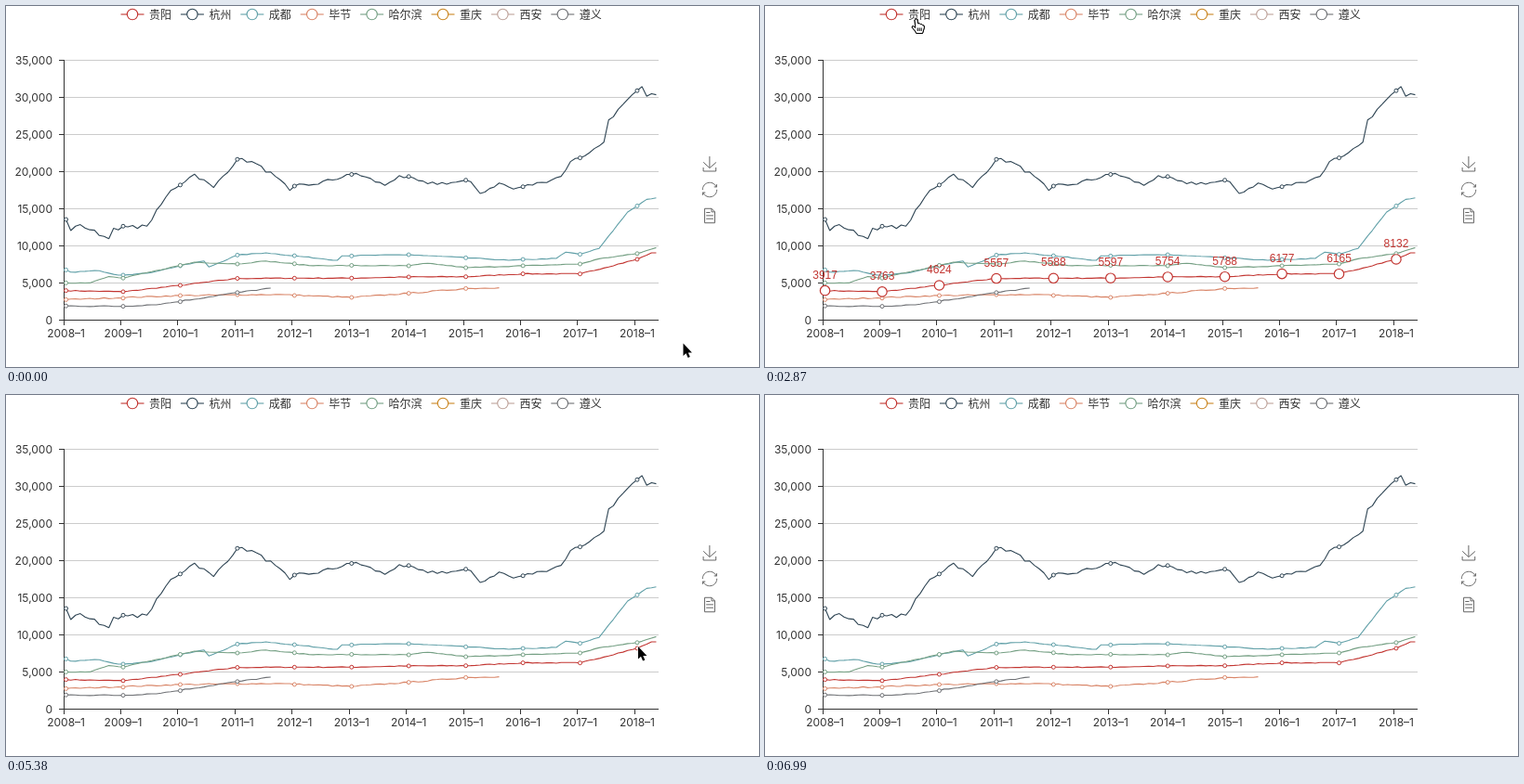
An HTML page with a canvas for the animation above (7350 ms loop, 810 px wide and 389 px high).

```html
<!DOCTYPE html>
<html lang="zh">
<head>
<meta charset="utf-8">
<style>
  html, body { margin: 0; width: 100%; height: 100%; overflow: hidden; background: #fff; }
  canvas { display: block; }
</style>
</head>
<body>
<canvas id="stage" width="810" height="389"></canvas>
<script>
const ctx = document.getElementById('stage').getContext('2d');
const LOOP = 7350, STEPS = 41;
const LEFT = 62, RIGHT = 702, TOP = 58, BASE = 338, BAND = 640 / 125;
const CJK = '"Noto Sans CJK SC", "Noto Sans CJK", sans-serif';
const LATIN = 'Inter, sans-serif';
const LABEL = '"Liberation Sans", Arial, sans-serif';
const RED = '#c23531', INK = '#333';

const januaryPrices = [3917, 3763, 4624, 5557, 5588, 5597, 5754, 5788, 6177, 6165, 8132];

const monthX = month => LEFT + BAND * (month + 0.5);
const priceY = thousands => BASE - thousands * 8;

// Linear interpolation over keys of the form [at, ...values]
function between(keys, at, field = 1) {
  const i = keys.findIndex(key => key[0] >= at);
  if (i <= 0) return keys[0][field];
  const a = keys[i - 1], b = keys[i];
  return a[field] + (b[field] - a[field]) * (at - a[0]) / (b[0] - a[0]);
}

let seed = 7;
const random = () => (seed = seed * 16807 % 2147483647) / 2147483647;

// Monthly prices: straight trends between turning points, with seeded noise
function monthly(keys, noise) {
  const exact = new Set(keys.map(key => key[0]));
  return Array.from({ length: keys.at(-1)[0] + 1 }, (_, month) =>
    between(keys, month) + (exact.has(month) ? 0 : (random() * 2 - 1) * noise));
}

// Turning points as [month, thousands]
const guiyang = [...januaryPrices.map((price, year) => [year * 12, price / 1000]),
  [123, 9], [124, 9]];
const hangzhou = [[0, 13.5], [1, 12], [3, 12.8], [9, 10.9], [10, 12.3], [17, 12.6], [22, 17.4],
  [27, 19.6], [31, 17.8], [36, 21.6], [39, 21.3], [44, 19.3], [47, 17.4], [48, 18], [52, 18.2],
  [61, 19.7], [67, 18.1], [70, 19.4], [76, 18.3], [85, 18.6], [87, 17], [91, 18.4], [94, 17.6],
  [100, 18.5], [104, 19.3], [106, 21.3], [110, 22.5], [113, 23.9], [114, 26.9], [121, 31.4],
  [122, 30.1], [124, 30.3]];
const chengdu = [[0, 6.7], [1, 6.4], [7, 6.6], [11, 6], [17, 6.25], [24, 7.25], [29, 7.9],
  [30, 7.1], [36, 8.7], [42, 9], [57, 8], [58, 8.6], [72, 8.75], [88, 8.2], [93, 8],
  [103, 8.25], [105, 9.1], [108, 8.8], [112, 9.6], [118, 14.5], [122, 16.2], [124, 16.4]];
const bijie = [[0, 2.7], [24, 3.25], [44, 3.4], [60, 3], [72, 3.55], [84, 4.2], [91, 4.3]];
const harbin = [[0, 4.95], [5, 4.95], [9, 5.8], [12, 5.6], [27, 7.75], [36, 7.5], [42, 7.9],
  [51, 7.3], [72, 7.25], [76, 7.6], [84, 7], [108, 7.5], [112, 8.2], [120, 8.9], [124, 9.7]];
const zunyi = [[0, 1.85], [12, 1.8], [20, 2.1], [36, 3.65], [43, 4.25]];

let legendX = 136;
const series = [
  ['贵阳', RED, monthly(guiyang, 0.06)],
  ['杭州', '#2f4554', monthly(hangzhou, 0.25)],
  ['成都', '#61a0a8', monthly(chengdu, 0.05)],
  ['毕节', '#d98669', monthly(bijie, 0.08)],
  ['哈尔滨', '#749f83', monthly(harbin, 0.05)],
  ['重庆', '#ca8622', []],
  ['西安', '#bda29a', []],
  ['遵义', '#6e7074', monthly(zunyi, 0.08)]
].map(([name, color, prices]) => {
  const x = legendX;
  legendX += 40.4 + 12 * name.length;
  return { name, x, color, prices };
});

// Pointer stops as [step, x, y]; it waits below the stage when away
const pointer = [[0, 728.5, 363.5], [1, 750, 379], [3, 760, 410], [4, 662, 352], [8, 385, 113],
  [9, 357, 173], [14, 170, 16], [15, 163, 14], [20, 163, 14], [21, 367.5, 261], [26, 491, 290],
  [29, 690, 247], [30, 680, 271], [31, 680, 274], [35, 680, 274], [38, 709, 375], [39, 712, 410],
  [40, 712, 410]];

function text(str, x, y, font, color = INK, align = 'left') {
  ctx.font = font;
  ctx.fillStyle = color;
  ctx.textAlign = align;
  ctx.fillText(str, x, y);
}

function ring(x, y, r, color, width = 1) {
  ctx.beginPath();
  ctx.arc(x, y, r, 0, Math.PI * 2);
  ctx.fillStyle = '#fff';
  ctx.fill();
  ctx.strokeStyle = color;
  ctx.lineWidth = width;
  ctx.stroke();
}

function polyline(points, color) {
  ctx.beginPath();
  points.forEach(([x, y]) => ctx.lineTo(x, y));
  ctx.strokeStyle = color;
  ctx.lineWidth = 1.1;
  ctx.lineJoin = 'bevel';
  ctx.stroke();
}

function drawAxes() {
  for (let i = 0; i <= 7; i++) {
    const y = priceY(i * 5);
    ctx.fillStyle = '#ccc';
    if (i) ctx.fillRect(LEFT, y, RIGHT - LEFT, 1);
    ctx.fillStyle = INK;
    ctx.fillRect(LEFT - 5, y, 5, 1);
    text((i * 5000).toLocaleString('en-US'), 50, y + 4.5, '12px ' + LATIN, INK, 'right');
  }
  ctx.fillRect(LEFT, TOP, 1, BASE - TOP + 1);
  ctx.fillRect(LEFT, BASE, RIGHT - LEFT, 1);
  for (let year = 0; year <= 10; year++) {
    ctx.fillRect(Math.floor(LEFT + year * 12 * BAND), BASE, 1, 6);
    text(2008 + year + '–1', monthX(year * 12), 356.5, '12px ' + LATIN, INK, 'center');
  }
}

function drawSeries({ name, x, color, prices }) {
  polyline([[x - 12.5, 9], [x + 12.5, 9]], color);
  ring(x, 9, 5.7, color, 1.1);
  text(name, x + 18, 13.5, '12px ' + CJK);
  polyline(prices.map((price, month) => [monthX(month), priceY(price)]), color);
  for (let m = 0; m < prices.length; m += 12) ring(monthX(m), priceY(prices[m]), 2, color);
}

const icons = [
  [170, 29.6, 29, 'M4.7 22.9L29.3 45.5L54.7 23.4M4.6 43.6V58H53.8V43.6M29.2 45.1V0'],
  [198, 30, 30, 'M47 18.9h9.8V8.7M56.3 20.1C52 9 40.5 .6 26.8 2.1C12.6 3.7 1.6 16.2 2.1 30.6' +
    'M13 41.1H3.1v10.2M3.7 39.9c4.2 11.1 15.8 19.5 29.5 18c14.2-1.6 25.2-14.1 24.7-28.5'],
  [226, 31.2, 30, 'M17.5 17.3H33M45.4 29.5h-28M11.5 2v56H51V14.8L38.4 2zM38.4 2.2v12.7H51M45.4 41.7h-28']
].map(([y, cx, cy, d]) => ({ y, cx, cy, path: new Path2D(d) }));

function drawIcon({ y, cx, cy, path }) {
  const scale = 0.276;
  ctx.save();
  ctx.translate(757, y);
  ctx.scale(scale, scale);
  ctx.translate(-cx, -cy);
  ctx.strokeStyle = '#666';
  ctx.lineWidth = 1 / scale;
  ctx.stroke(path);
  ctx.restore();
}

function highlight(price, year) {
  const x = monthX(year * 12), y = priceY(price / 1000);
  ring(x, y, 5.2, RED, 1.2);
  text(price, x, y - 13, '12px ' + LABEL, RED, 'center');
}

function drawTooltip(x) {
  ctx.fillStyle = 'rgba(50,50,50,0.7)';
  ctx.beginPath();
  ctx.roundRect(x, 291, 113, 52, 4);
  ctx.fill();
  text('贵阳', x + 5, 311.5, 'bold 14px ' + CJK, '#fff');
  ctx.fillStyle = RED;
  ctx.beginPath();
  ctx.arc(x + 10, 327, 5, 0, Math.PI * 2);
  ctx.fill();
  text('2018–1: 8,132', x + 20, 332.3, '600 14px ' + LATIN, '#fff');
}

const arrow = new Path2D('M0 0V13.5L3 10.8L5.1 15.6L7.3 14.6L5.3 9.9H9.4Z');
const hand = new Path2D('M-2 1Q-.5-1 1 1L1.7 5Q3.5 4 4.3 5.8Q6 5 6.6 6.8Q8.6 6.4 8.4 9' +
  'L7.6 12L6.5 15.5H-.2L-1.5 13L-4.8 9.2Q-5 7.2-3.2 7.8L-1.2 9.5Z');
const knuckles = new Path2D('M1.2 9.5V13M3.2 9.5V13M5.2 9.5V13');

function drawPointer(step, pointing) {
  const shape = pointing ? hand : arrow;
  ctx.save();
  ctx.translate(between(pointer, step, 1), between(pointer, step, 2));
  ctx.lineWidth = 1;
  ctx.fillStyle = pointing ? '#fff' : '#000';
  ctx.strokeStyle = pointing ? '#000' : '#fff';
  ctx.stroke(shape);
  ctx.fill(shape);
  if (pointing) {
    ctx.stroke(shape);
    ctx.stroke(knuckles);
  }
  ctx.restore();
}

function draw(now) {
  // The picture advances in even steps of about 180 ms
  const step = Math.min(STEPS - 1, Math.floor((now % LOOP + 10) / (LOOP / STEPS)));
  const onLegend = step >= 14 && step <= 20;
  const onPoint = step >= 31 && step <= 35;
  ctx.clearRect(0, 0, 810, 389);
  drawAxes();
  series.forEach(drawSeries);
  icons.forEach(drawIcon);
  if (onLegend) januaryPrices.forEach(highlight);
  if (onPoint) {
    highlight(januaryPrices[10], 10);
    drawTooltip(step < 33 ? 535 : 537);
  }
  drawPointer(step, onLegend || onPoint);
}

const start = performance.now();
function tick() {
  draw(performance.now() - start);
  requestAnimationFrame(tick);
}
tick();
</script>
</body>
</html>
```
